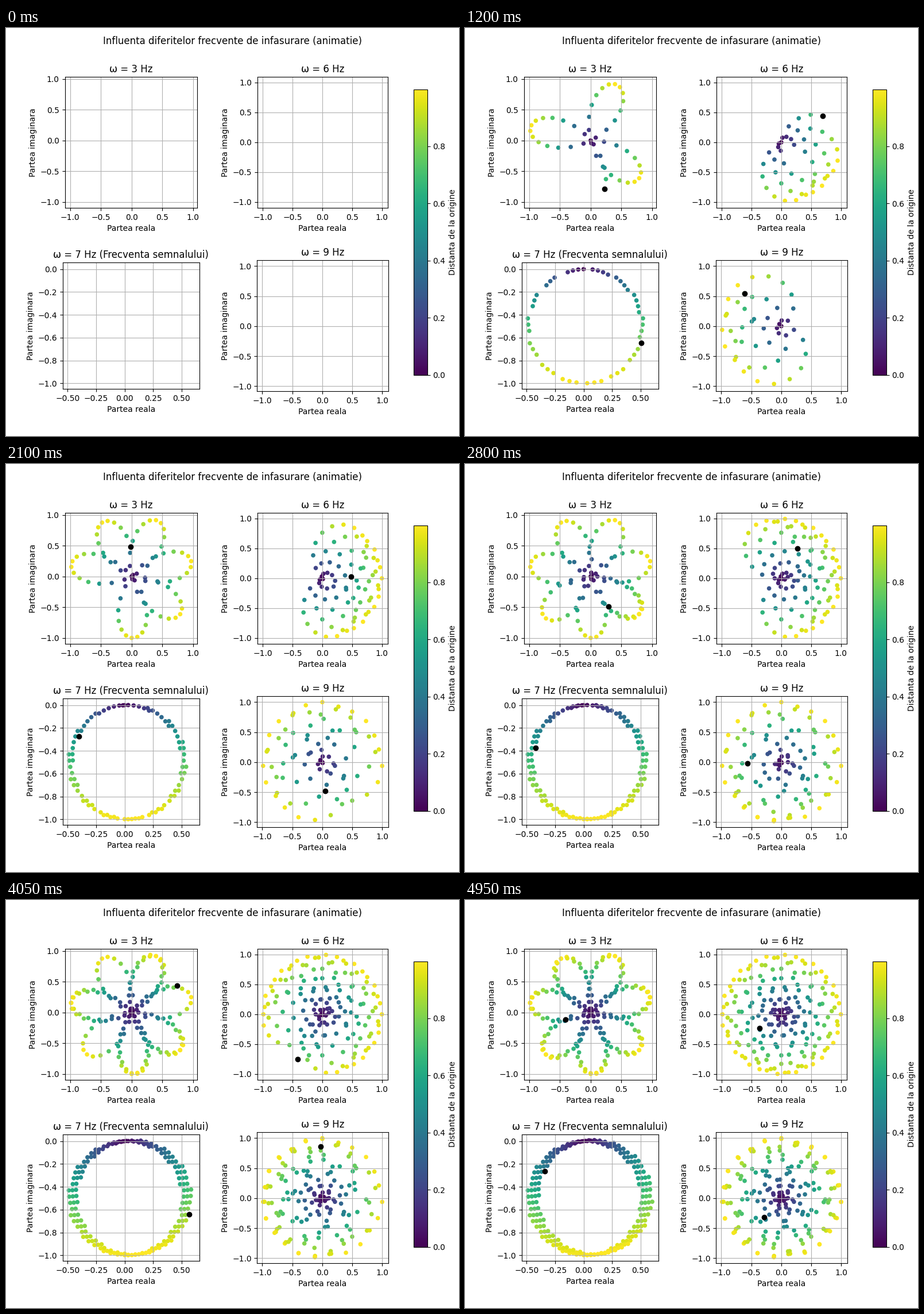
Write a matplotlib script that moves like this. It is 789 px wide and 710 px high and loops after 5000 ms.

```python
import numpy as np
import matplotlib.pyplot as plt
from matplotlib.animation import FuncAnimation

SAMPLES = 200
SIGNAL_HZ = 7
PER_FRAME = 2
WINDINGS = (3, 6, SIGNAL_HZ, 9)

# The signal includes its end point while the winding does not,
# so the matching frequency slowly drifts sideways.
n = np.arange(SAMPLES)
signal = np.sin(2 * np.pi * SIGNAL_HZ * np.linspace(0, 1, SAMPLES))
dist = np.abs(signal)

fig, axes = plt.subplots(2, 2, figsize=(7.89, 7.10), dpi=100)
fig.subplots_adjust(right=0.85, hspace=0.4, wspace=0.4)
fig.suptitle("Influenta diferitelor frecvente de infasurare (animatie)")


def make_panel(ax, freq):
    z = signal * np.exp(-2j * np.pi * freq * n / SAMPLES)
    points = np.column_stack([z.real, z.imag])
    trail = ax.scatter(*points.T, c=dist, s=20, cmap="viridis",
                       vmin=dist.min(), vmax=dist.max())
    head, = ax.plot([], [], "ko")
    note = " (Frecventa semnalului)" if freq == SIGNAL_HZ else ""
    ax.set_title(f"ω = {freq} Hz{note}")
    ax.set_xlabel("Partea reala")
    ax.set_ylabel("Partea imaginara")
    ax.set_aspect("equal")
    ax.grid(True)
    # Freeze the limits fitted to the whole curve
    ax.set_xlim(ax.get_xlim())
    ax.set_ylim(ax.get_ylim())
    return points, trail, head


panels = [make_panel(ax, freq) for ax, freq in zip(axes.flat, WINDINGS)]
fig.colorbar(panels[0][1], cax=fig.add_axes([0.9, 0.15, 0.03, 0.7]),
             label="Distanta de la origine")


def update(frame):
    count = PER_FRAME * frame
    for points, trail, head in panels:
        trail.set_offsets(points[:count])
        trail.set_array(dist[:count])
        head.set_data(*points[max(count - 1, 0):count].T)
    return [artist for panel in panels for artist in panel[1:]]


anim = FuncAnimation(fig, update, frames=SAMPLES // PER_FRAME, interval=50,
                     repeat=True, repeat_delay=0)
plt.show()
```
